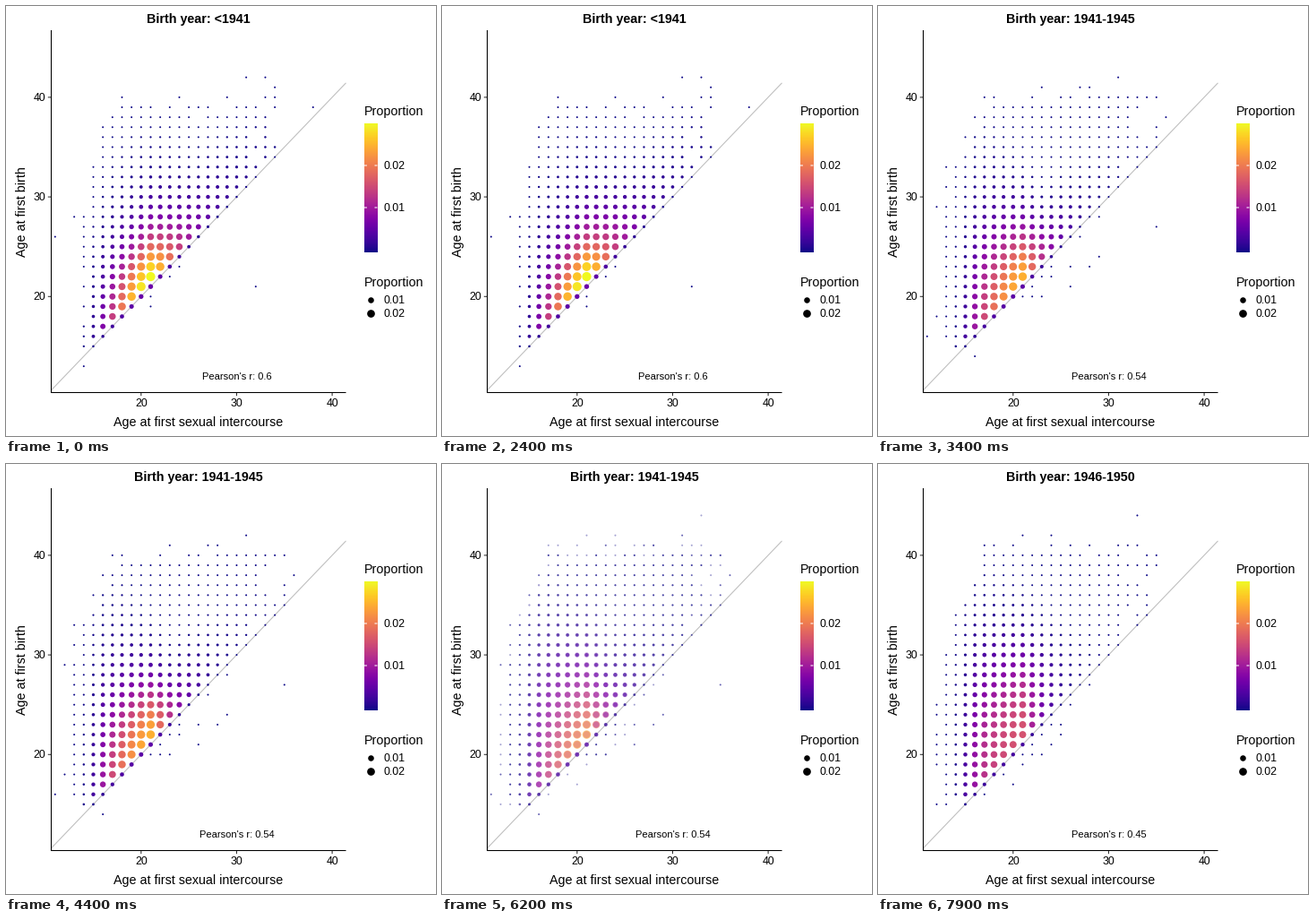
Recreate the animation shown at these times as a matplotlib script. Size 480 by 480 pixels, loop 8 s.

```python
import numpy as np
import matplotlib.pyplot as plt
from matplotlib.animation import FuncAnimation

plt.rcParams["font.family"] = "Liberation Sans"

SIZE, DPI = 480, 72  # one point equals one pixel
STEP, LOOP = 100, 8000
FADE, STARTS = 800, (2400, 5900)
TOP = 0.0298  # upper end of the proportion scale
PLASMA = plt.get_cmap("plasma")
BIG, MID, SMALL = 14.25, 12.4, 11.1

# peak: highest proportion; rise, drop: spread either side of age 21
# reach, slope, power: how the proportion falls with the gap to the birth
# first, last: where the filled block thins out
COHORTS = [
    dict(title="<1941", r="0.6", peak=0.0298, rise=4.7, drop=3.8,
         reach=5.1, slope=0.3, power=1.5, first=13.8, last=39),
    dict(title="1941-1945", r="0.54", peak=0.0245, rise=6, drop=2.8,
         reach=5.9, slope=0.8, power=1.8, first=12.6, last=40),
    dict(title="1946-1950", r="0.45", peak=0.016, rise=9, drop=2.2,
         reach=9, slope=0.75, power=2.5, first=12.3, last=40.5),
]


def px(age):
    return 150.8 + 10.665 * (age - 20)


def py(age):
    return 324.3 - 11.12 * (age - 20)


def area(p):
    return (2 * (0.75 + 4.4 * np.sqrt(p / 0.03))) ** 2


def proportion(c, x, y):
    """Share of each pair of ages: a skewed peak that decays with the gap."""
    early = np.exp(-((21 - np.minimum(x, 21)) / c["rise"]) ** 2)
    late = np.exp(-((np.maximum(x, 21) - 21) / c["drop"]) ** 1.2)
    onset = 1 / (1 + np.exp(-2 * (x - 15.3)))
    reach = np.maximum(c["reach"] + c["slope"] * (20 - x), 3.4)
    gap = y - x
    decay = np.exp(-(np.maximum(gap - 1, 0) / reach) ** c["power"])
    decay = np.where(gap > 0, decay, np.where(gap == 0, 0.2, 0))
    return np.maximum(c["peak"] * early * late * onset * decay, 0.0001)


def expected(c, x, y):
    """Expected count near the rim of the block, large inside it."""
    last = c["last"] - 2.5 * np.maximum(17 - x, 0)
    edges = [1.6 * (x - c["first"]), 0.7 * (last - y),
             0.4 * (33 - x), 1.2 * (y - 14.8)]
    inside = np.exp(2 * np.minimum.reduce(edges).clip(-3, 3) * 0.8)
    below = 0.6 * np.exp(-0.5 * (x - y - 1) - ((y - 20) / 5) ** 2)
    return np.where(y >= x, inside, below)


def dots(c, seed):
    x, y = np.meshgrid(np.arange(11, 42), np.arange(13, 45))
    luck = np.random.default_rng(seed).random(x.shape)
    seen = luck < 1 - np.exp(-expected(c, x, y))
    x, y = x[seen], y[seen]
    return x, y, proportion(c, x, y)


fig = plt.figure(figsize=(SIZE / DPI, SIZE / DPI), dpi=DPI, facecolor="white")
ax = fig.add_axes([0, 0, 1, 1])
ax.axis("off")


def text(x, y, s, size=BIG, ha="left", **kw):
    return ax.text(x, y, s, fontsize=size, ha=ha, va="baseline",
                   color="black", **kw)


def line(xs, ys, color="black", **kw):
    ax.plot(xs, ys, color=color, lw=1.07, solid_capstyle="butt",
            snap=False, **kw)


# Panel
ends = np.array([10.59, 41.44])
line(px(ends), py(ends), "#bebebe", zorder=1)
line([50.5, 50.5], [27, 432], zorder=4)
line([50, 379.5], [431.5, 431.5], zorder=4)
for age in (20, 30, 40):
    x, y = px(age), py(age)
    line([x, x], [431.5, 435.2], "#333333")
    line([46.8, 50.5], [y, y], "#333333")
    text(x, 447, str(age), MID, "center")
    text(44, round(y + 4), str(age), MID, "right")
text(215, 469, "Age at first sexual intercourse", ha="center")
text(22, 230, "Age at first birth", ha="center", rotation=90,
     rotation_mode="anchor")

# Legends
text(400, 122, "Proportion")
ax.imshow(np.linspace(1, 0, 300)[:, None], cmap=PLASMA, aspect="auto",
          extent=(400, 414.4, 274.6, 130.6))
for y, s in ((178, "0.02"), (225, "0.01")):
    for x in (400, 411.5):
        line([x, x + 2.9], [y, y], "white", zorder=3)
    text(421, y + 4, s, MID)
text(400, 313, "Proportion")
for y, p in ((328.3, 0.01), (342.7, 0.02)):
    ax.scatter([407.2], [y], s=area(p), color="black", lw=0)
    text(421, round(y + 4), f"{p:.2f}", MID)

# Dots, one layer per cohort
layers = []
for seed, c in enumerate(COHORTS):
    x, y, p = dots(c, seed)
    layers.append(ax.scatter(px(x), py(y), s=area(p), lw=0, zorder=2,
                             c=PLASMA(np.clip(p / TOP, 0, 1))))

title = text(214.5, 19, "", ha="center", weight="bold")
note = text(257.7, 417, "", SMALL, "center")
ax.set_xlim(0, SIZE)
ax.set_ylim(SIZE, 0)


def update(i):
    ramps = [min(max((i * STEP - s) / FADE, 0), 1) for s in STARTS]
    alphas = (1 - ramps[0], ramps[0] * (1 - ramps[1]), ramps[1])
    for layer, a in zip(layers, alphas):
        layer.set_alpha(a)
        layer.set_visible(a > 0)
    # The note flips at the midpoint, the title just after it
    title.set_text("Birth year: " + COHORTS[sum(k > 0.5 for k in ramps)]["title"])
    note.set_text("Pearson's r: " + COHORTS[sum(k >= 0.5 for k in ramps)]["r"])
    return [*layers, title, note]


anim = FuncAnimation(fig, update, frames=LOOP // STEP, interval=STEP,
                     repeat=True, repeat_delay=0, blit=False)
plt.show()
```
